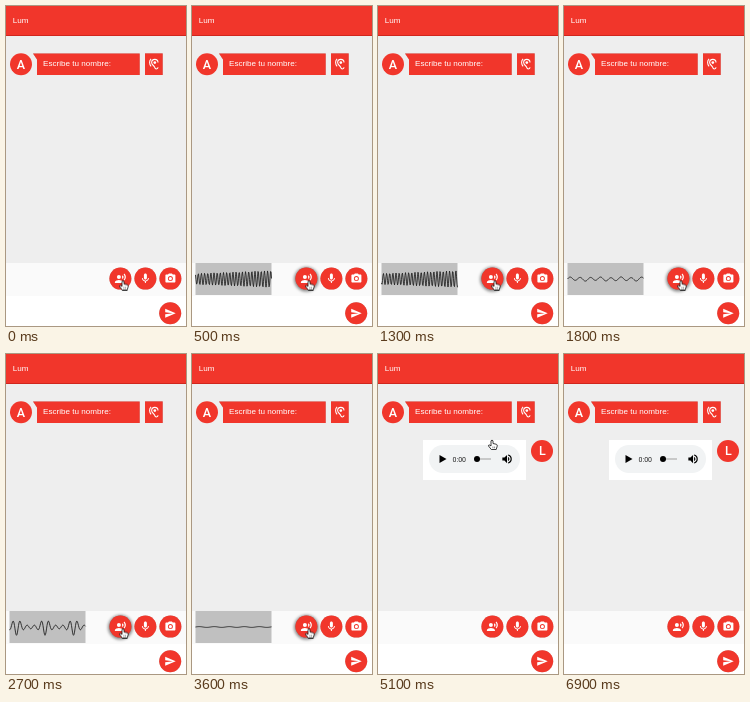
Write an HTML page that moves like this. It is 180 px wide and 320 px high and loops after 7 s.

```html
<!DOCTYPE html>
<html lang="es">
<head>
<meta charset="utf-8">
<title>Chat con nota de voz</title>
<style>
  html, body { margin: 0; width: 100%; height: 100%; overflow: hidden; background: #eee; }
  svg { display: block; width: 100vw; height: 100vh; }
  text { font-family: "Liberation Sans", Arial, sans-serif; font-size: 8.1px; fill: #fff; }
  .initial { font: 500 12.5px Roboto, sans-serif; text-anchor: middle; }
  .time { font: 7px Roboto, sans-serif; fill: #222; }
  .red { fill: #f1362b; }
  .white { fill: #fff; }
  .raised { filter: drop-shadow(0 .6px .6px rgba(0, 0, 0, .25)); }

  .glow, .panel, .message, .cursor { animation: 7s infinite; }
  .glow { animation-name: glow; }
  .panel { animation-name: record; animation-timing-function: step-end; }
  .message { animation-name: deliver; animation-timing-function: step-end; }
  .cursor { animation-name: point; animation-timing-function: ease-in-out; }

  @keyframes glow {
    0%, 1.4% { opacity: 0; }
    4.3%, 55% { opacity: 1; }
    58.5%, 100% { opacity: 0; }
  }
  @keyframes record {
    0% { visibility: hidden; }
    3.9% { visibility: visible; }
    55.5%, 100% { visibility: hidden; }
  }
  @keyframes deliver {
    0% { visibility: hidden; }
    55.5%, 100% { visibility: visible; }
  }
  @keyframes point {
    0%, 58% { transform: translate(117px, 274.5px); }
    65%, 69.5% { transform: translate(115px, 89px); }
    72.5%, 85.5% { transform: translate(114px, 86px); }
    92%, 100% { transform: translate(186px, 78px); }
  }
</style>
</head>
<body>
<svg viewBox="0 0 180 320" preserveAspectRatio="none">
  <defs>
    <filter id="blur" x="-50%" y="-50%" width="200%" height="200%"><feGaussianBlur stdDeviation="1.5"/></filter>
    <path id="voice" d="M13 9a4 4 0 1 1-8 0a4 4 0 1 1 8 0zM9 15c-2.67 0-8 1.34-8 4v2h16v-2c0-2.66-5.33-4-8-4zM16.76 5.36l-1.68 1.69c.84 1.18.84 2.71 0 3.89l1.68 1.69c2.02-2.02 2.02-5.07 0-7.27zM20.07 2l-1.63 1.63c2.77 3.02 2.77 7.56 0 10.74L20.07 16c3.9-3.89 3.91-9.95 0-14z"/>
    <path id="mic" d="M12 14c1.66 0 3-1.34 3-3V5c0-1.66-1.34-3-3-3S9 3.34 9 5v6c0 1.66 1.34 3 3 3zm5.3-3c0 3-2.54 5.1-5.3 5.1S6.7 14 6.7 11H5c0 3.41 2.72 6.23 6 6.72V21h2v-3.28c3.28-.48 6-3.3 6-6.72z"/>
    <path id="camera" d="M9 2L7.2 4H4c-1.1 0-2 .9-2 2v12c0 1.1.9 2 2 2h16c1.1 0 2-.9 2-2V6c0-1.1-.9-2-2-2h-3.2L15 2zm3 15a5 5 0 1 1 0-10a5 5 0 1 1 0 10zM15.2 12a3.2 3.2 0 1 1-6.4 0a3.2 3.2 0 1 1 6.4 0z"/>
    <path id="send" d="M2 21L23 12 2 3v7l15 2-15 2z"/>
    <g id="ear">
      <path d="M20 9a6 6 0 0 0-12 0c0 5 4.5 5.3 5.5 8.5s2 3.5 3.5 3.5a3 3 0 0 0 3-3M7 2a10 10 0 0 0 0 14" fill="none" stroke="#fff" stroke-width="2"/>
      <circle cx="14" cy="9" r="2.5"/>
    </g>
    <path id="volume" d="M3 9v6h4l5 5V4L7 9zm13.5 3c0-1.8-1-3.3-2.5-4v8c1.5-.7 2.5-2.2 2.5-4zM14 3.2v2.1a7 7 0 0 1 0 13.4v2.1a9 9 0 0 0 0-17.6z"/>
  </defs>

  <rect width="180" height="320" fill="#eee"/>
  <rect y="257" width="180" height="33" fill="#fafafa"/>
  <rect y="290" width="180" height="30" class="white"/>

  <g class="raised">
    <rect width="180" height="30" class="red"/>
    <rect y="29" width="180" height="1" fill="#d0261d"/>
  </g>
  <text x="6.7" y="17.3">Lum</text>

  <circle cx="15" cy="58.3" r="11" class="red"/>
  <text class="initial" x="15" y="62.6">A</text>
  <path class="red raised" d="M27 47.4H133.7V69H31V53.5z"/>
  <text x="37" y="60.4">Escribe tu nombre:</text>
  <rect class="red raised" x="139" y="47.4" width="17.7" height="21.6"/>
  <use href="#ear" class="white" transform="translate(141.4 51.8) scale(.53)"/>

  <g class="message">
    <rect class="white raised" x="45" y="86" width="103" height="40"/>
    <rect x="51" y="91" width="91" height="28" rx="14" fill="#f1f3f4"/>
    <path d="M61.5 101L68.5 105L61.5 109z"/>
    <text class="time" x="74.5" y="107.6">0:00</text>
    <path d="M97 105H113" stroke="#bbb" stroke-width="1.5"/>
    <circle cx="99" cy="105" r="3"/>
    <use href="#volume" transform="translate(122.8 98.8) scale(.52)"/>
    <circle cx="164" cy="97" r="11" class="red"/>
    <text class="initial" x="164.3" y="101.4">L</text>
  </g>

  <g class="panel">
    <rect x="3.5" y="257" width="76" height="32" fill="#c0c0c0"/>
    <path id="wave" fill="none" stroke="#222" stroke-width=".9" stroke-linejoin="round"/>
  </g>

  <circle class="glow" cx="114.4" cy="273.3" r="12.3" fill="#000" fill-opacity=".45" filter="url(#blur)"/>
  <g id="buttons"></g>

  <g class="cursor">
    <path d="M-1 .8Q0-.6 1 .8V3.5L4.5 4.3Q5.5 4.8 5.2 6.2L4.2 9.5H-.7L-3.5 6Q-3.6 4.6-2.3 5L-1 6z" fill="#fff" stroke="#111" stroke-width=".8" stroke-linejoin="round"/>
    <path d="M.9 6.5v1.8M2.6 6.5v1.8" stroke="#222" stroke-width=".5"/>
  </g>
</svg>
<script>
  const LOOP = 7000, STEP = 100;
  const LEFT = 3.5, WIDTH = 76, MIDDLE = 273;
  const TAU = 2 * Math.PI;
  const wave = document.getElementById('wave');

  const button = (icon, x, y) => `
    <circle class="red raised" cx="${x}" cy="${y}" r="11"/>
    <use href="#${icon}" class="white" transform="translate(${x - 6} ${y - 6}) scale(.5)"/>`;
  document.getElementById('buttons').innerHTML =
    button('voice', 114.4, 272.6) + button('mic', 139.4, 272.6) +
    button('camera', 164.4, 272.6) + button('send', 164.2, 307.2);

  // Each signal gives a height at x for a step counted from its central moment.
  const tone = (x, n) =>
    (7.5 + 4 * x / WIDTH) * Math.exp(-n * n / 50) * Math.sin(TAU * x / 3.15 + n);

  const murmur = (x, n) =>
    (1 + .3 * Math.sin(n)) * (1.7 * Math.sin(TAU * x / 10.2 + n * 2) + .4 * Math.sin(TAU * x / 24 + n));

  const vowel = (x, n) => {
    const turn = (x - 35.5) / 28.5 + n * .4;
    const p = turn - Math.round(turn);
    const burst = 1.8 + 6.5 * Math.exp(-((p / .18) ** 2));
    return -(1 - Math.abs(n) * .1) * burst * Math.cos(TAU * 4 * p);
  };

  const hush = (x, n) => .4 * Math.sin(TAU * x / 15 + n);

  const signalAt = step =>
    step < 14 ? [tone, 9] :
    step < 23 ? [murmur, 18] :
    step < 32 ? [vowel, 27] : [hush, 36];

  function draw(now) {
    const step = Math.floor((now % LOOP + 20) / STEP);
    const [signal, centre] = signalAt(step);
    let d = '';
    for (let x = 0; x <= WIDTH; x += .5) {
      d += `${d ? 'L' : 'M'}${LEFT + x} ${(MIDDLE - signal(x, step - centre)).toFixed(2)}`;
    }
    wave.setAttribute('d', d);
    requestAnimationFrame(draw);
  }
  draw(performance.now());
</script>
</body>
</html>
```
